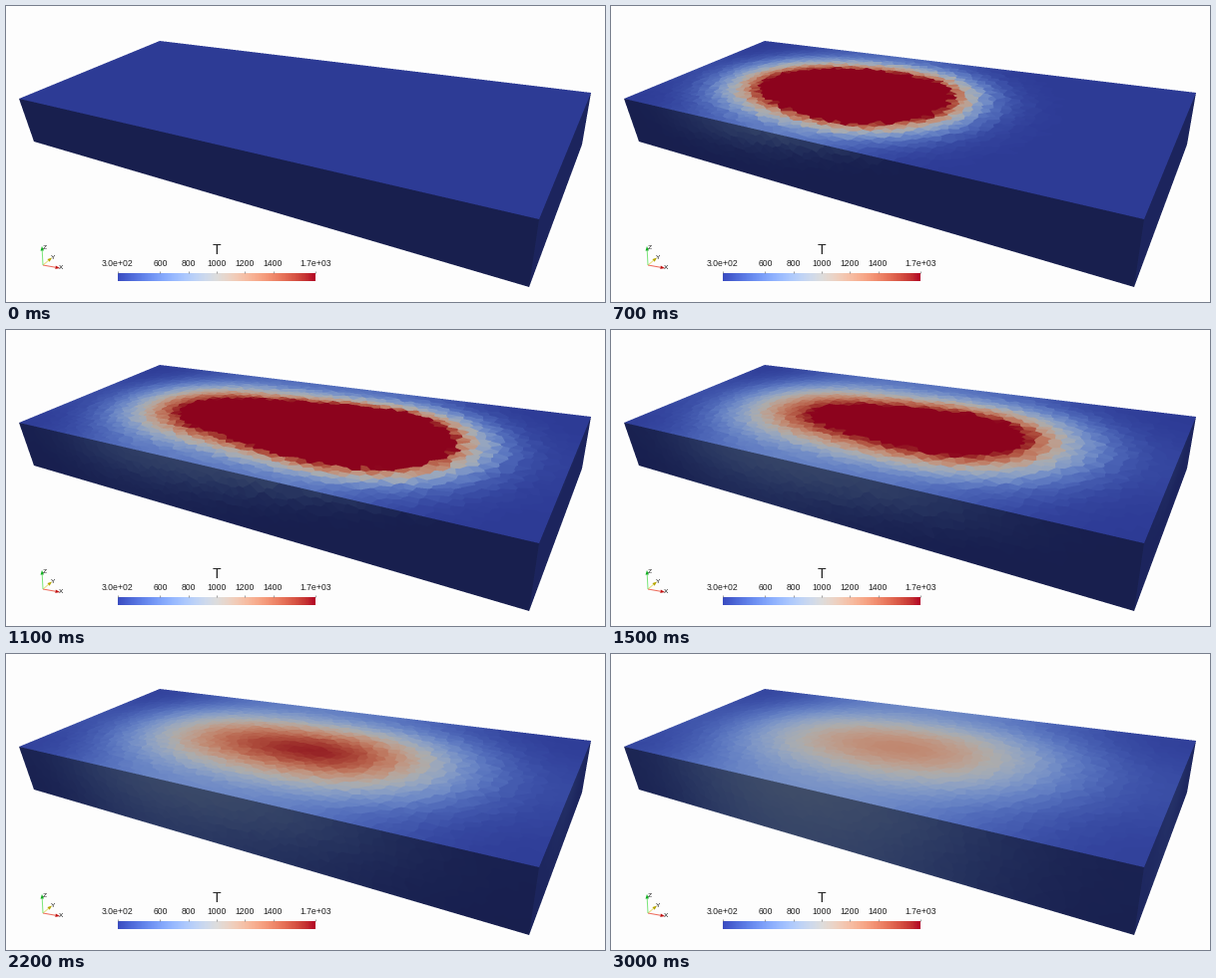
Animation, 600 px wide and 297 px high, one loop 3100 ms. Source, as a matplotlib script:

```python
import numpy as np
import matplotlib.pyplot as plt
from matplotlib.animation import FuncAnimation
from matplotlib.patches import Polygon

W, H, SS = 600, 297, 3          # stage size and supersampling
FRAMES, STEP_MS = 31, 100
LENGTH, DEPTH = 2.0, 0.28       # slab size, width is 1
T_MIN, T_MAX = 300, 1700
BACKGROUND = np.array([254, 254, 254]) / 255

# Moving heat source; times are counted in frames
T_ON, T_OFF = 0.85, 11.8
X_START, SPEED, Y_MID = 0.45, 0.098, 0.49
SPOT2, KAPPA, POWER = 0.059, 0.001, 1680

rng = np.random.default_rng(7)


def homography(corners):
    """Matrix that maps the unit square onto four corners."""
    (x0, y0), (x1, y1), (x2, y2), (x3, y3) = corners
    m = np.array([[x1 - x2, x3 - x2], [y1 - y2, y3 - y2]], float)
    g, h = np.linalg.solve(m, [x0 - x1 + x2 - x3, y0 - y1 + y2 - y3])
    return np.array([[x1 - x0 + g * x1, x3 - x0 + h * x3, x0],
                     [y1 - y0 + g * y1, y3 - y0 + h * y3, y0],
                     [g, h, 1]])


def nearest_cell(u, v, seeds, nu, nv):
    """Index of the closest jittered seed for every (u, v)."""
    a, b = u * nu, v * nv
    ia, ib = a.astype(int), b.astype(int)
    best = np.full(a.shape, np.inf)
    label = np.zeros(a.shape, int)
    for da in (-1, 0, 1):
        for db in (-1, 0, 1):
            ca = np.clip(ia + da, 0, nu - 1)
            cb = np.clip(ib + db, 0, nv - 1)
            k = cb * nu + ca
            dist = (seeds[k, 0] - a) ** 2 + (seeds[k, 1] - b) ** 2
            closer = dist < best
            best[closer] = dist[closer]
            label[closer] = k[closer]
    return label


px, py = np.meshgrid((np.arange(W * SS) + 0.5) / SS,
                     (np.arange(H * SS) + 0.5) / SS)
labels = np.zeros(px.shape, int)    # 0 is the background
cells, shades = [], []


def add_face(corners, nu, nv, place, shade):
    inv = np.linalg.inv(homography(corners))
    q = [r[0] * px + r[1] * py + r[2] for r in inv]
    u, v = q[0] / q[2], q[1] / q[2]
    inside = (u >= 0) & (u < 1) & (v >= 0) & (v < 1)
    gu, gv = np.meshgrid(np.arange(nu) + 0.5, np.arange(nv) + 0.5)
    seeds = np.column_stack([gu.ravel(), gv.ravel()])
    seeds += rng.uniform(-0.45, 0.45, seeds.shape)
    first = 1 + sum(len(c) for c in cells)
    labels[inside] = first + nearest_cell(u[inside], v[inside], seeds, nu, nv)
    pos = seeds + rng.normal(0, 0.13, seeds.shape)
    cells.append(np.column_stack(place(pos[:, 0] / nu, pos[:, 1] / nv)))
    shades.append(np.full(len(seeds), shade))


FL, FR, BR, BL = (13, 93), (534, 214), (586, 87), (154, 35)
FL_LOW, FR_LOW, BR_LOW = (28, 136), (524, 282), (577, 139)

add_face([FL, FR, BR, BL], 58, 29,
         lambda u, v: (LENGTH * u, v, 0 * u), 0.78)
add_face([FL, FR, FR_LOW, FL_LOW], 58, 8,
         lambda u, v: (LENGTH * u, 0 * u, DEPTH * v), 0.41)
add_face([FR, BR, BR_LOW, FR_LOW], 29, 8,
         lambda u, v: (LENGTH + 0 * u, u, DEPTH * v), 0.485)

X, Y, Z = np.concatenate(cells).T
SHADE = np.concatenate(shades)[:, None]


def mirrored(p, centre, size, spread):
    """Gaussian around a centre, reflected by insulated walls."""
    return sum(np.exp(-(c - centre) ** 2 / spread)
               for c in (p, -p, 2 * size - p))


def temperature(n):
    """Sum the spreading heat of all pulses emitted up to frame n."""
    total = np.full(X.shape, float(T_MIN))
    end = min(n, T_OFF)
    if end <= T_ON:
        return total
    edges = np.linspace(T_ON, end, int((end - T_ON) / 0.12) + 2)
    for t0, t1 in zip(edges[:-1], edges[1:]):
        age = n - (t0 + t1) / 2
        x_src = X_START + SPEED * ((t0 + t1) / 2 - T_ON)
        dose = 2 * (np.sqrt(n - t0) - np.sqrt(max(n - t1, 0)))
        grow = 4 * KAPPA * age
        spread = SPOT2 + grow
        deep = sum(np.exp(-d ** 2 / grow)
                   for d in (Z, 2 * DEPTH - Z, 2 * DEPTH + Z))
        total += (POWER * dose * SPOT2 / spread * deep
                  * mirrored(X, x_src, LENGTH, spread)
                  * mirrored(Y, Y_MID, 1, spread))
    return total


def render(n):
    level = (temperature(n) - T_MIN) / (T_MAX - T_MIN)
    colours = plt.cm.coolwarm(np.clip(level, 0, 1))[:, :3] * SHADE
    table = np.vstack([BACKGROUND, colours]).astype(np.float32)
    picture = table[labels]
    return sum(picture[i::SS, j::SS]
               for i in range(SS) for j in range(SS)) / SS ** 2


fig = plt.figure(figsize=(W / 100, H / 100), dpi=100, facecolor=BACKGROUND)
ax = fig.add_axes([0, 0, 1, 1])
slab = ax.imshow(render(0), extent=(0, W, H, 0), aspect="auto",
                 interpolation="nearest", vmin=0, vmax=1)


def label(x, y, text, size, colour="#222222"):
    ax.text(x, y, text, fontsize=size * 0.72, color=colour, ha="center",
            va="center_baseline", family="Liberation Sans")


def line(p, q, colour, width):
    ax.plot([p[0], q[0]], [p[1], q[1]], color=colour, lw=width * 0.72,
            solid_capstyle="butt")


# Colour legend
BAR_L, BAR_R = 112, 310
ax.imshow(np.linspace(0, 1, 256)[None], cmap="coolwarm", aspect="auto",
          extent=(BAR_L, BAR_R, 276, 268), zorder=2)
label(211, 243.5, "T", 14)
for value in (300, 600, 800, 1000, 1200, 1400, 1700):
    x = BAR_L + (BAR_R - BAR_L) * (value - T_MIN) / (T_MAX - T_MIN)
    ends = {300: "3.0e+02", 1700: "1.7e+03"}
    label(x, 257.5, ends.get(value, str(value)), 8.6)
    line((x, 265.5), (x, 268), "#777777", 0.7)

# Orientation axes
origin = (37, 260)
for tip, colour, dark, name, at in (
        ((46, 252.5), "#e8e07a", "#b5a500", "Y", (47, 251.5)),
        ((54, 263), "#ee6a5a", "#c01010", "X", (55, 261.5)),
        ((36, 241), "#7be67b", "#10b020", "Z", (38.5, 242))):
    d = np.subtract(tip, origin) / np.hypot(*np.subtract(tip, origin))
    side = np.array([-d[1], d[0]]) * 1.7
    base = np.array(tip) - d * 4.5
    line(origin, base, colour, 1)
    ax.add_patch(Polygon([tip, base + side, base - side], fc=dark, lw=0,
                         zorder=3))
    label(*at, name, 6.5, "#111111")

ax.set_xlim(0, W)
ax.set_ylim(H, 0)
ax.axis("off")


def update(n):
    slab.set_data(render(n))
    return [slab]


anim = FuncAnimation(fig, update, frames=FRAMES, interval=STEP_MS,
                     repeat=True, repeat_delay=0)
plt.show()
```
